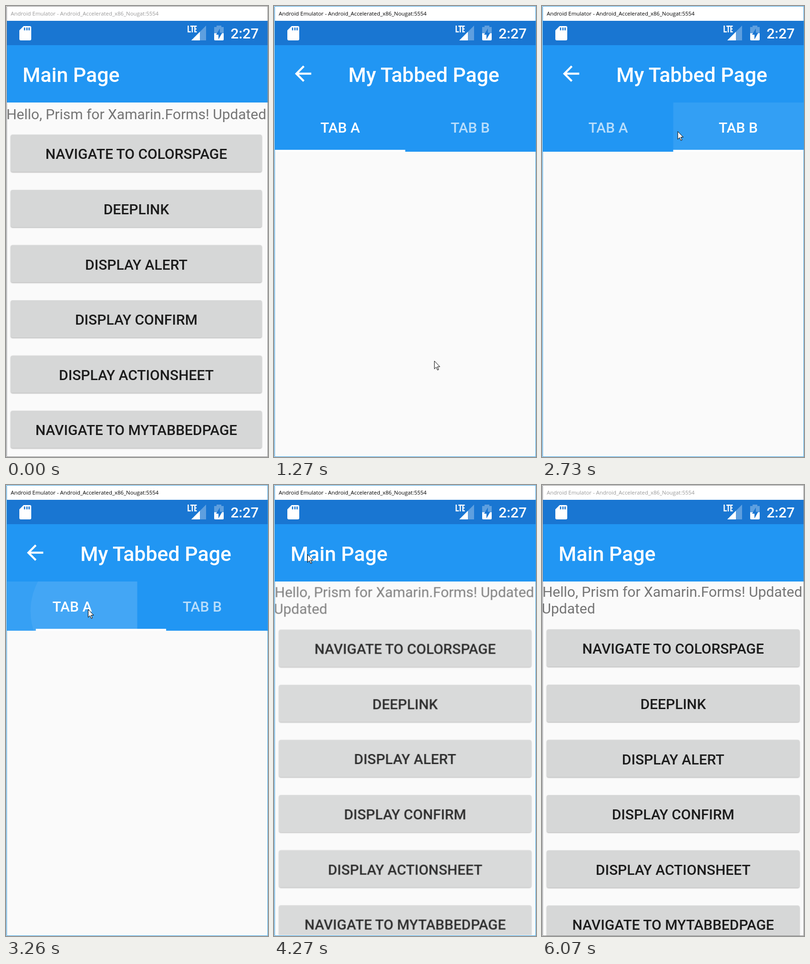
These frames come from a looping animation (550 by 944 pixels, 6210 ms). An HTML page:

```html
<!DOCTYPE html>
<html lang="en">
<head>
<meta charset="utf-8">
<title>Tabbed navigation</title>
<style>
  html, body { margin: 0; width: 100%; height: 100%; overflow: hidden; background: #fafafa; }
  body > svg { display: block; width: 100vw; height: 100vh; }
  text { font-family: Roboto, sans-serif; font-size: 30px; white-space: pre; }
  .medium { font-weight: 500; }
  .title { font-size: 42.8px; font-weight: 500; fill: #fff; }
  .mid { text-anchor: middle; }
  #caption { font: 11.4px "Open Sans", sans-serif; }
  #buttons rect { fill: #d6d7d7; filter: drop-shadow(0 1.5px 1.2px rgba(0,0,0,.32)); }
</style>
</head>
<body>
<svg viewBox="0 0 550 944">
  <clipPath id="pageClip"><rect x="2" y="202" width="547" height="741"/></clipPath>
  <rect width="550" height="944" fill="#fafafa"/>

  <g id="main" clip-path="url(#pageClip)">
    <g fill="#757575">
      <text id="hello" class="mid" x="273.7">Hello, Prism for Xamarin.Forms! Updated</text>
      <text id="hello2" x="-.5" y="269">Updated</text>
    </g>
    <g id="buttons"></g>
    <svg id="press" x="10" y="847" width="527" height="78" viewBox="10 847 527 78">
      <rect x="10" y="847" width="527" height="78"/><circle cx="380" cy="870"/>
    </svg>
  </g>

  <g id="tabs">
    <rect x="2" y="305" width="547" height="640" fill="#fafafa"/>
    <rect x="0" y="200" width="550" height="105" fill="#2196f3"/>
    <svg id="tapA" x="2" y="202" width="273.5" height="103" viewBox="2 202 273.5 103" fill="#fff">
      <rect x="2" y="202" width="274" height="103"/><circle cx="182" cy="264"/>
    </svg>
    <svg id="tapB" x="275.5" y="202" width="273.5" height="103" viewBox="275.5 202 273.5 103" fill="#fff">
      <rect x="275" y="202" width="274" height="103"/><circle cx="393" cy="264"/>
    </svg>
    <g class="medium mid" fill="#fff">
      <text id="tabA" x="139" y="265">TAB A</text>
      <text id="tabB" x="412" y="265">TAB B</text>
    </g>
    <rect id="bar" y="301" width="273.5" height="4" fill="#fff"/>
  </g>

  <rect y="31" width="550" height="51" fill="#1976d2"/>
  <rect y="82" width="550" height="120" fill="#2196f3"/>
  <g fill="#fff">
    <path d="M37 42H50Q53 42 53 45V69Q53 72 50 72H31Q28 72 28 69V51Z"/>
    <path d="M39 45v6M44 45v6M48.5 45v6" stroke="#1976d2" stroke-width="2.6"/>
    <path d="M382.5 41V54H388M387 42.2H395M391 42V55.2M400.5 42.2H396.5V54H400.5M396.5 48H400" fill="none" stroke="#fff" stroke-width="2.4"/>
    <path d="M420 41V72H389Z" opacity=".3"/>
    <path d="M407 54V72H389Z"/>
    <path d="M442 41H452V44H457V57H437V44H442Z" opacity=".3"/>
    <path d="M437 57H457V70Q457 72 455 72H439Q437 72 437 70Z"/>
    <path d="M449 47L441 60H446V70L454 56H449Z" fill="#1976d2"/>
    <text class="medium" x="471.5" y="68">2:27</text>
  </g>
  <text id="mainTitle" class="title" x="34.8" y="159">Main Page</text>
  <g id="tabTitle">
    <circle id="tapBack" cx="63.5" cy="142.5" r="34" fill="#fff" opacity=".1"/>
    <path fill="#fff" transform="translate(35.4 116) scale(2.14)"
      d="M20 11H7.83l5.59-5.59L12 4l-8 8 8 8 1.41-1.41L7.83 13H20z"/>
    <text class="title" x="156" y="159">My Tabbed Page</text>
  </g>

  <rect width="550" height="31" fill="#fff"/>
  <text id="caption" x="10" y="20">Android Emulator - Android_Accelerated_x86_Nougat:5554</text>
  <path d="M.5 1V944" stroke="#dfe1e7"/>
  <path id="frame" d="M1.5 .5V943.5H549.5V.5Z" fill="none"/>

  <g id="cursor">
    <circle id="busy" cx="14" cy="0" r="5.5" fill="#d5e7f5" stroke="#5f9ccb" stroke-width="4.5"/>
    <path d="M.5 .5V17L4.3 13.4L7 19.5L9.4 18.5L6.8 12.5H12Z" fill="#fff" stroke="#000"/>
  </g>
</svg>
<script>
const LOOP = 6210;
const $ = id => document.getElementById(id);
const set = (el, attrs) => { for (const k in attrs) el.setAttribute(k, attrs[k]); };
const show = (id, on) => set($(id), { visibility: on ? "visible" : "hidden" });
const clamp = v => Math.min(1, Math.max(0, v));

// The screen refreshes only in bursts: [first, last, count]
const bursts = [[0, 0, 1], [190, 420, 4], [590, 590, 1], [880, 1500, 9], [1570, 2120, 8],
  [2340, 2880, 8], [3110, 3720, 9], [3800, 3800, 1], [4120, 4350, 4], [4730, 5280, 8],
  [5360, 5600, 4], [6070, 6070, 1]];
const refreshes = bursts.flatMap(([a, b, n]) =>
  Array.from({ length: n }, (_, i) => Math.floor((a + (b - a) * i / Math.max(1, n - 1)) / 10) * 10));

// Pointer path: [time, x, y]
const path = [[190, 453, 928], [420, 396, 888], [590, 376, 862], [1190, 376, 862],
  [1500, 200, 333], [1640, 161, 285], [1800, 190, 258], [2000, 330, 253], [2120, 390, 264],
  [2570, 390, 264], [2880, 172, 260], [3300, 172, 260], [3720, 72, 147], [3800, 70, 145],
  [4650, 70, 145], [4960, 191, 363], [5280, 425, 680], [5600, 519, 895]];

const labels = ["NAVIGATE TO COLORSPAGE", "DEEPLINK", "DISPLAY ALERT", "DISPLAY CONFIRM",
  "DISPLAY ACTIONSHEET", "NAVIGATE TO MYTABBEDPAGE"];
$("buttons").innerHTML = labels.map(s =>
  `<rect x="10" height="78" rx="4"/><text class="medium mid" fill="#1c1c1c">${s}</text>`).join("");

function layoutMain(wrapped) {
  const top = wrapped ? 302.3 : 269.3, width = wrapped ? 530.5 : 527;
  set($("hello"), { y: wrapped ? 234 : 236.5 });
  show("hello2", wrapped);
  [...$("buttons").children].forEach((el, i) => {
    const y = top + 115.6 * (i >> 1);
    set(el, i % 2 ? { x: 10 + width / 2, y: y + 51 } : { y, width });
  });
}

function zoom(id, scale, cy, opacity) {
  set($(id), { transform: `translate(275 ${cy}) scale(${scale}) translate(-275 ${-cy})`, opacity });
}

function ripple(id, age, strength) {
  const [wash, circle] = $(id).children;
  const fade = age < 0 ? 0 : clamp((520 - age) / 270) * strength;
  set(wash, { opacity: fade });
  set(circle, { opacity: fade * .7, r: Math.max(0, Math.min(240, 30 + age * .67)) });
}

function pointer(t) {
  const i = path.findIndex(p => p[0] > t);
  if (i < 1) return path.at(i).slice(1);
  const [t0, x0, y0] = path[i - 1], [t1, x1, y1] = path[i], u = (t - t0) / (t1 - t0);
  return [x0 + (x1 - x0) * u, y0 + (y1 - y0) * u];
}

function draw(t) {
  const popped = t >= 4120, onTabs = t >= 1030 && t < 4190, active = t >= 590 && t < 6070;
  layoutMain(popped);

  // Push: tabs fade in while shrinking; pop: main page fades in while growing
  const push = clamp((t - 1030) / 205), pop = clamp((t - 4070) / 217);
  if (popped) zoom("main", .977 + .023 * pop, 574, pop);
  else zoom("main", 1 - .038 * push, 526, push < 1 ? 1 : 0);
  zoom("tabs", 1.094 - .094 * push, 551, popped ? 0 : push);

  ripple("press", t < 1030 ? t - 880 : -1, .07);
  ripple("tapB", t - 2340, .095);
  ripple("tapA", t - 3110, .095);

  const slide = start => 1 - (1 - clamp((t - start) / 380)) ** 3;
  set($("bar"), { x: 2 + 273.5 * (slide(2340) - slide(3110)) });
  const second = t >= 2400 && t < 3180;
  set($("tabA"), { opacity: second ? .68 : 1 });
  set($("tabB"), { opacity: second ? 1 : .68 });

  show("mainTitle", !onTabs);
  show("tabTitle", onTabs);
  show("tapBack", onTabs && popped);
  set($("caption"), { fill: active ? "#000" : "#999" });
  set($("frame"), { stroke: active ? "#3a9fe0" : "#8c8c8c" });

  const visible = t >= 190 && t < 6070;
  show("cursor", visible);
  show("busy", visible && t >= 880 && t < 1260);
  set($("cursor"), { transform: `translate(${pointer(t)})` });
}

let start;
function tick(now) {
  start ??= now;
  const t = (now - start) % LOOP;
  draw(refreshes.findLast(r => r <= t));
  requestAnimationFrame(tick);
}
draw(0);
requestAnimationFrame(tick);
</script>
</body>
</html>
```
